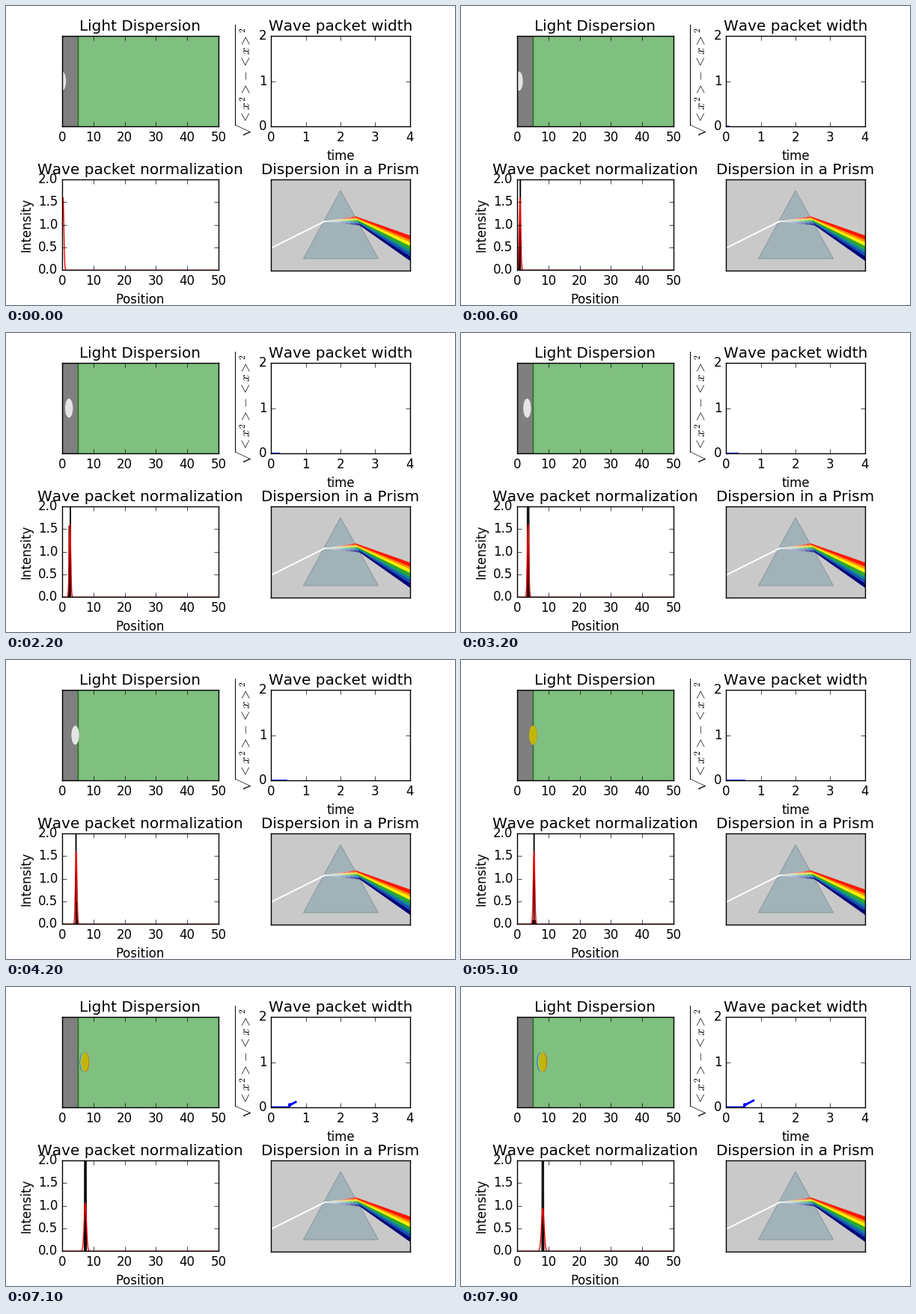
Recreate the animation shown at these times as a matplotlib script. Size 600 by 400 pixels, loop 8000 ms.

```python
import numpy as np
import matplotlib.pyplot as plt
from matplotlib.animation import FuncAnimation
from matplotlib.colors import to_rgb
from matplotlib.patches import Ellipse, Polygon

W, H = 600, 400
FRAMES = 80
SPEED = 0.1      # packet travel per frame
BORDER = 5       # where the glass begins
ENTRY = 51       # frame of entry into the glass
PX = 209 / 50    # pixels per position unit

plt.rcParams.update({
    "font.family": "DejaVu Sans", "font.size": 12, "mathtext.fontset": "cm",
    "text.kerning_factor": 6,
    "axes.titlesize": 14.4, "axes.titlepad": 5, "axes.titley": 1.0,
    "axes.labelpad": 5, "axes.linewidth": 1, "axes.axisbelow": False,
    "xtick.direction": "in", "ytick.direction": "in",
    "xtick.top": True, "ytick.right": True, "ytick.alignment": "center",
    "xtick.major.size": 4, "ytick.major.size": 4,
    "xtick.major.width": 0.5, "ytick.major.width": 0.5,
    "xtick.major.pad": 4, "ytick.major.pad": 4,
    "lines.solid_capstyle": "projecting",
})

fig = plt.figure(figsize=(W / 100, H / 100), dpi=100, facecolor="white")


def panel(left, top, right, bottom, title, xlim, ylim, xticks=(), yticks=()):
    ax = fig.add_axes([left / W, 1 - bottom / H,
                       (right - left) / W, (bottom - top) / H])
    ax.set(title=title, xlim=xlim, ylim=ylim)
    ax.set_xticks(xticks)
    ax.set_yticks(yticks)
    return ax


positions = range(0, 51, 10)
light = panel(75, 40, 284, 161, "Light Dispersion",
              (0, 50), (-60.5, 60.5), positions)
width = panel(354.2, 40, 539.8, 161, "Wave packet width",
              (0, 4), (0, 2), range(5), range(3))
norm = panel(75, 232, 284, 353.4, "Wave packet normalization",
             (0, 50), (0, 2), positions, np.arange(0, 2.1, 0.5))
prism = panel(354.2, 232, 539.8, 354, "Dispersion in a Prism",
              (354.2, 539.8), (354, 232))

width.set_xlabel("time")
width.set_ylabel(r"$\sqrt{<x^2> - <x>^2}$")
norm.set_xlabel("Position")
norm.set_ylabel("Intensity")

# Air, glass and the travelling light spot
light.axvspan(0, BORDER, color="black", alpha=0.5)
light.axvspan(BORDER, 50, color="green", alpha=0.5)


def spot(color):
    e = Ellipse((0, 0), 10.4 / PX, 25.5, fc=color, ec="none")
    return light.add_patch(e)


white_spot = spot("#e4e4e4")
# colour and final shift in pixels, back to front
hues = [("#1030c8", -1.3), ("#7fe0d8", -0.5), ("#d82810", 1.7),
        ("#e08a18", 1.2), ("#c0b608", 0.8)]
hue_spots = [(spot(c), shift) for c, shift in hues]

trace, = width.plot([], [], color="blue", lw=2)
wave, = norm.plot([], [], color="black", lw=0.7)
envelope, = norm.plot([], [], color="red", lw=1)


def draw_prism():
    def shape(points, color, **kw):
        prism.add_patch(Polygon(points, fc=color, **{"ec": "none", **kw}))

    prism.set_facecolor("#c9c9c9")
    shape([(447, 247), (397.5, 338), (497.5, 338)], "#a1b3b9",
          ec="#87979c", lw=0.7)
    bands = ["#ff1800", "#ff8c00", "#fff000", "#2fa828",
             "#0c8c8c", "#1450b4", "#000078"]
    parts = np.array([0, 0.17, 0.27, 0.42, 0.57, 0.69, 0.83, 1])[:, None]
    exits = np.array([467, 281.5]) + parts * np.array([6, 12])
    ends = np.array([541, 307.5]) + parts * np.array([0, 34])
    apex = np.array([425.5, 288])
    cuts = np.linspace(0, 1, 9)
    for k, band in enumerate(bands):
        rgb = np.array(to_rgb(band))
        a, b = exits[k], exits[k + 1]
        for s, t in zip(cuts[:-1], cuts[1:]):
            mix = 0.75 * t ** 1.5
            tint = tuple(mix * rgb + (1 - mix) * np.array([0.93, 0.96, 0.97]))
            shape([apex + s * (a - apex), apex + t * (a - apex),
                   apex + t * (b - apex), apex + s * (b - apex)],
                  tint, ec=tint, lw=0.2)
        shape([a, ends[k], ends[k + 1], b], band, ec=band, lw=0.2)
    prism.plot([354, 426], [324, 288], color="white", lw=1.4)


draw_prism()

x = np.linspace(0, 50, 4001)
steps = np.arange(FRAMES)
late = np.maximum(steps - ENTRY - 2, 0)
spread = np.where(
    steps > ENTRY + 1,
    0.045 + 0.0041 * late + 0.03 * np.exp(-late / 3) * np.cos(late * 1.6), 0)


def update(i):
    pos = SPEED * i
    inside = i >= BORDER / SPEED
    white_spot.center = (pos, 0)
    white_spot.set_visible(not inside)
    grow = max(i - ENTRY, 0) / (FRAMES - 1 - ENTRY)
    for e, shift in hue_spots:
        e.center = (pos + shift * grow / PX, 0)
        e.set_visible(inside)

    trace.set_data(0.01 * steps[:i + 1], spread[:i + 1])
    trace.set_visible(i > 0)

    sigma = 0.25 + 0.17 * grow ** 0.9
    peak = 1 / (np.sqrt(2 * np.pi) * sigma)
    d = x - pos - 0.3
    envelope.set_data(x, peak * np.exp(-d ** 2 / (2 * sigma ** 2)))
    # fast carrier under a very narrow packet
    phase = 2 * np.pi * (i - 12) / 7.8
    carrier = 18 * peak * np.exp(-d ** 2 / 0.034) * np.cos(4 * np.pi * d - phase)
    wave.set_data(x, np.clip(carrier, -1, 4))
    wave.set_visible(i > 0)
    return [white_spot, trace, envelope, wave] + [e for e, _ in hue_spots]


anim = FuncAnimation(fig, update, frames=FRAMES, interval=100,
                     repeat=True, repeat_delay=0, blit=False)
plt.show()
```
